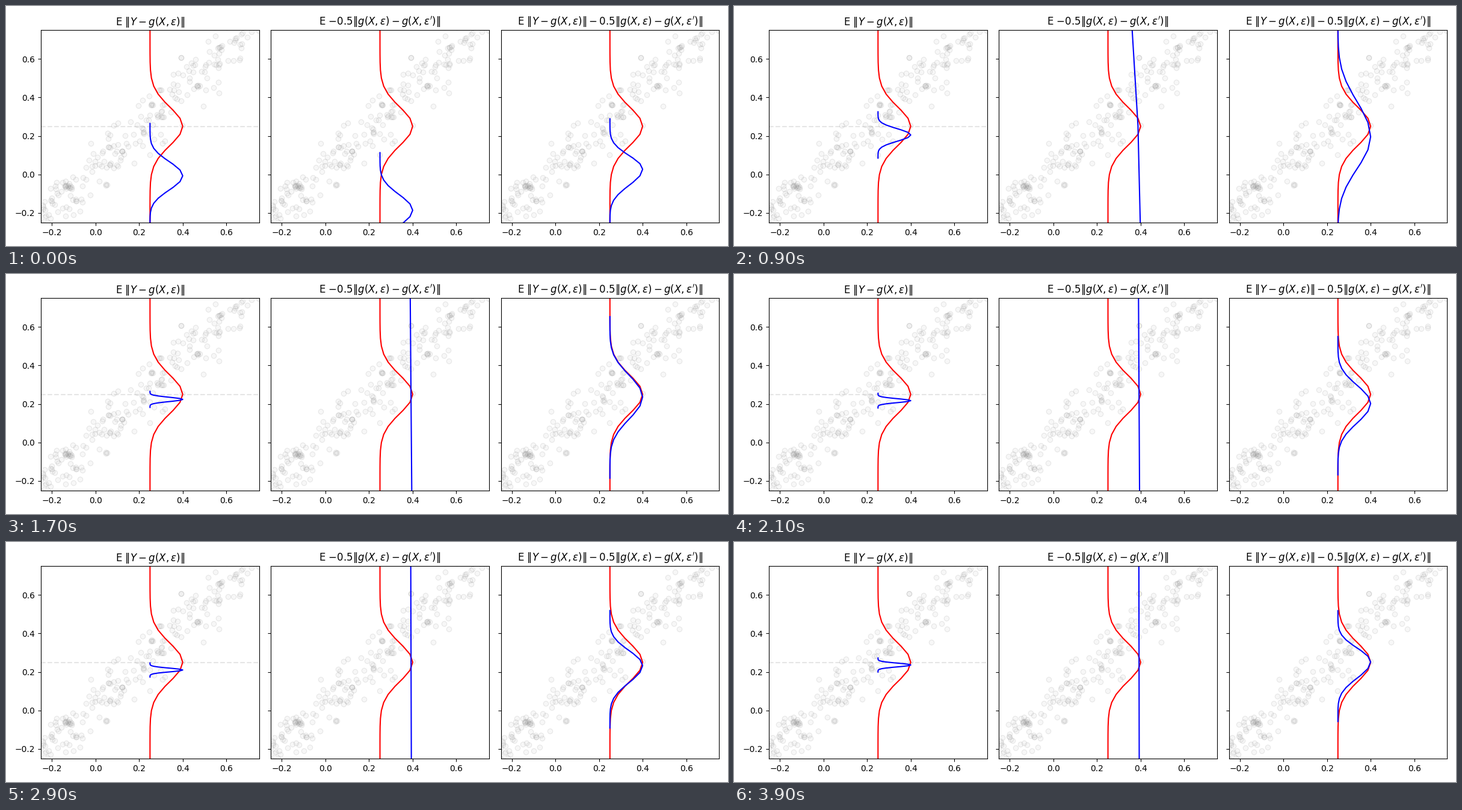
Write a matplotlib script that moves like this. It is 1200 by 400 pixels and loops after 4000 ms.

```python
import numpy as np
import matplotlib.pyplot as plt
from matplotlib.animation import FuncAnimation

W, H = 1200, 400
FRAMES, INTERVAL = 40, 100
LEFT, RIGHT, BOTTOM, TOP = 58.1, 1185, 39, 360
PANEL_W, GAP = 362.5, 19.7

# Noise grid: each curve is (density of eps, generator output at eps).
EPS = np.linspace(-5, 5, 25)
DENSITY = 0.25 + 0.15 * np.exp(-EPS**2 / 2)
TAIL = 4.8
RESPONSE = TAIL * np.tanh(EPS / TAIL)  # flattens for extreme noise

KEYS = [0, 5, 13, 21, 29, 33, 39]
FIT_CENTRE = [-.007, .180, .230, .217, .210, .269, .236]
BOTH_CENTRE = [.027, .121, .270, .202, .233, .280, .252]


def fit_only(t):
    """Finds the mean, then collapses onto it."""
    spread = 0.0097 + 0.063 / (1 + (t / 8) ** 5)
    return np.interp(t, KEYS, FIT_CENTRE) + spread * RESPONSE


def spread_only(t):
    """Diverges: the spread grows without bound."""
    spread = 0.08 + 0.026 * t**1.8
    crossing = 0.25 + 5.2 * np.exp(-t / 2.6)
    return 0.25 + spread * (RESPONSE - crossing)


def both(t):
    """Overshoots once, then settles on the true distribution."""
    burst = t / 5 * np.exp(1 - t / 5)
    below, above = 0.082 + 0.1 * burst, 0.07 + 0.135 * burst
    spread = np.where(EPS < 0, below, above)
    return np.interp(t, KEYS, BOTH_CENTRE) + spread * RESPONSE


PANELS = (
    (r"E $\|Y-g(X,\varepsilon)\|$", fit_only),
    (r"E $-0.5\|g(X,\varepsilon)-g(X,\varepsilon')\|$", spread_only),
    (r"E $\|Y-g(X,\varepsilon)\|-0.5\|g(X,\varepsilon)-g(X,\varepsilon')\|$",
     both),
)

# Spots where several samples overlap.
CLUMPS = [(-.14, -.06), (.048, -.055), (.122, .125), (.067, .053),
          (-.087, -.135), (.572, .66), (.467, .46), (.257, .363),
          (.296, .437), (.285, .305), (.22, .215)]


def make_samples():
    rng = np.random.default_rng(11)
    x = rng.uniform(-0.27, 0.77, 205)
    y = x + 0.035 + np.clip(rng.normal(0, 0.08, x.size), -0.18, 0.18)
    clumps = np.repeat(CLUMPS, 3, axis=0)
    clumps += rng.normal(0, 0.003, clumps.shape)
    return np.vstack([np.column_stack([x, y]), clumps]).T


fig, axes = plt.subplots(1, 3, sharey=True, figsize=(W / 100, H / 100), dpi=100)
fig.subplots_adjust(left=LEFT / W, right=RIGHT / W, bottom=BOTTOM / H,
                    top=TOP / H, wspace=GAP / PANEL_W)

xs, ys = make_samples()
curves = []
for ax, (title, _) in zip(axes, PANELS):
    ax.scatter(xs, ys, s=36, facecolors=(.5, .5, .5, .06),
               edgecolors=(.5, .5, .5, .17), linewidths=0.8)
    ax.plot(DENSITY, 0.25 + 0.1 * EPS, color="red")
    curves.append(ax.plot([], [], color="blue")[0])
    ax.set(xlim=(-0.25, 0.75), ylim=(-0.25, 0.75), title=title)
axes[0].axhline(0.25, color="gray", alpha=0.2, linestyle="--", zorder=1.5)


def update(frame):
    for curve, (_, model) in zip(curves, PANELS):
        curve.set_data(DENSITY, model(frame))
    return curves


anim = FuncAnimation(fig, update, frames=FRAMES, interval=INTERVAL,
                     repeat=True, repeat_delay=0)
plt.show()
```
